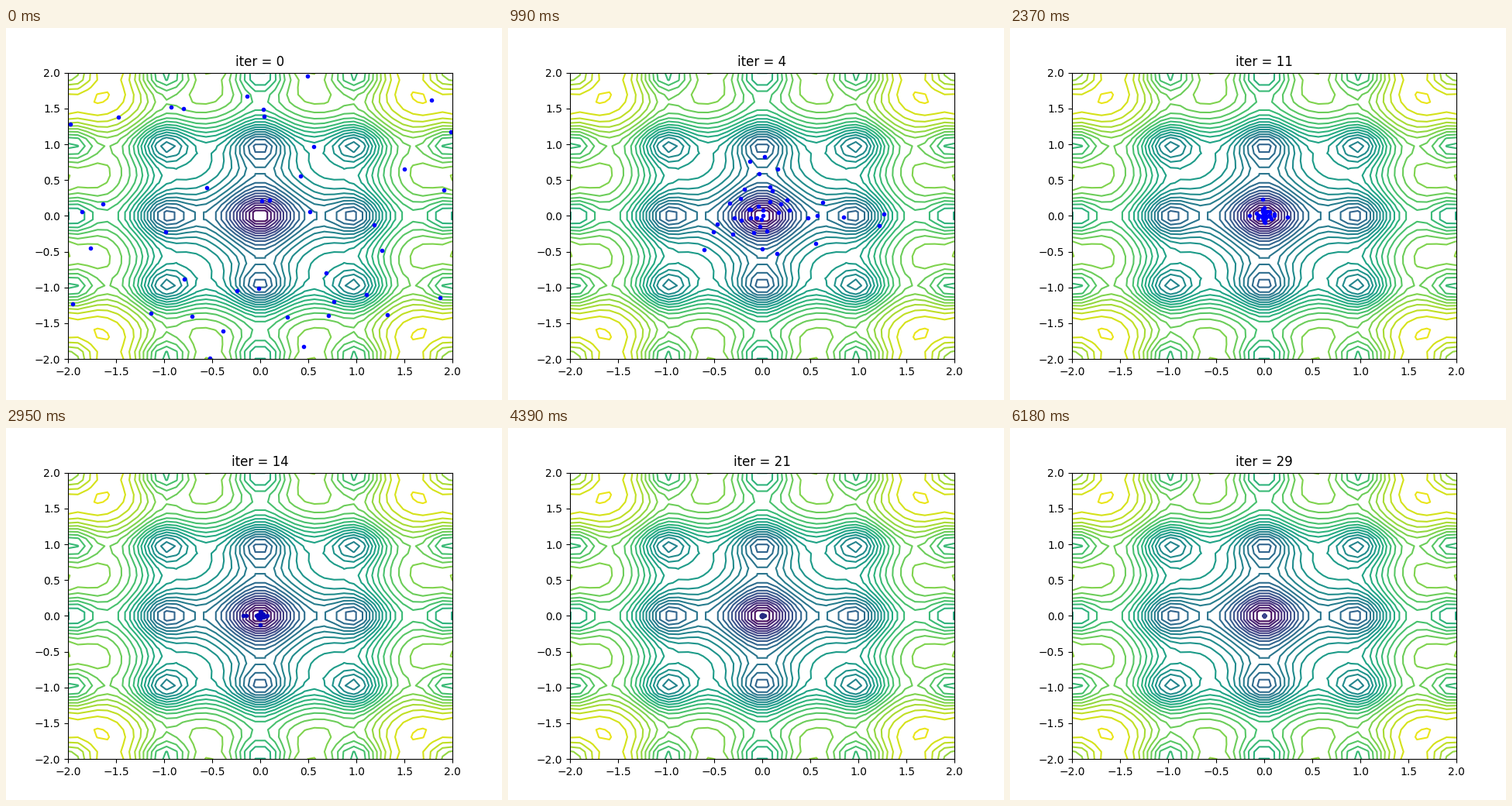
These frames come from a looping animation (640 px wide and 480 px high, 6.23 s). A matplotlib script:

```python
import numpy as np
import matplotlib.pyplot as plt
from matplotlib.animation import FuncAnimation

LOOP, TICK, SUBSTEP = 6230, 10, 20     # ms
COUNT, ITERS = 40, 30
INERTIA, PULL = 0.5, 1.3

# start of every iteration: a first hold, a steady run, a slower tail
starts = np.r_[0, 250 + 200 * np.arange(23), 4850 + 230 * np.arange(6)]


def ackley(x, y):
    bowl = -20 * np.exp(-0.2 * np.sqrt((x**2 + y**2) / 2))
    waves = -np.exp((np.cos(2 * np.pi * x) + np.cos(2 * np.pi * y)) / 2)
    return bowl + waves + 20 + np.e


def fly_swarm(seed=7):
    """Particle positions after each iteration, shape (ITERS, COUNT, 2)."""
    rng = np.random.default_rng(seed)
    best = np.array([0.1, 0.22])
    pos = rng.uniform(-2, 2, (COUNT, 2))
    pos[0] = best
    vel = np.zeros_like(pos)
    path = [pos]
    for _ in range(ITERS - 1):
        vel = INERTIA * vel + PULL * rng.random(pos.shape) * (best - pos)
        pos = pos + vel
        best = best * 0.4
        path.append(pos)
    return np.array(path)


path = fly_swarm()


def dot_color(t):
    """Blue that turns navy, then slate, as the swarm closes up."""
    keys = [2370, 3610, 5000]
    channels = [(0, 0.04, 0.23), (0, 0.03, 0.27), (1, 0.45, 0.55)]
    return [np.interp(t, keys, c) for c in channels]


fig, ax = plt.subplots(figsize=(6.4, 4.8), dpi=100)
grid = np.linspace(-2, 2, 40)
X, Y = np.meshgrid(grid, grid)
contours = ax.contour(X, Y, ackley(X, Y), 30)
ax.set(xlim=(-2, 2), ylim=(-2, 2))

# keep the still parts as one picture so each frame draws quickly
ax.spines[:].set_visible(False)
fig.canvas.draw()
still = np.array(fig.canvas.buffer_rgba())
contours.remove()
ax.patch.set_visible(False)
ax.xaxis.set_visible(False)
ax.yaxis.set_visible(False)
ax.spines[:].set_visible(True)
fig.figimage(still, zorder=-1)

dots, = ax.plot([], [], "b.")
title = ax.set_title("iter = 0")


def update(frame):
    t = frame * TICK
    k = np.searchsorted(starts, t, side="right") - 1
    step = min((t - starts[k]) // SUBSTEP, 9)
    prev = path[max(k - 1, 0)]
    pos = prev + (path[k] - prev) * step / 10
    dots.set_data(*pos.T)
    dots.set_color(dot_color(t))
    title.set_text(f"iter = {k}")
    return dots, title


anim = FuncAnimation(fig, update, frames=LOOP // TICK, interval=TICK,
                     repeat=True, repeat_delay=0)
plt.show()
```
